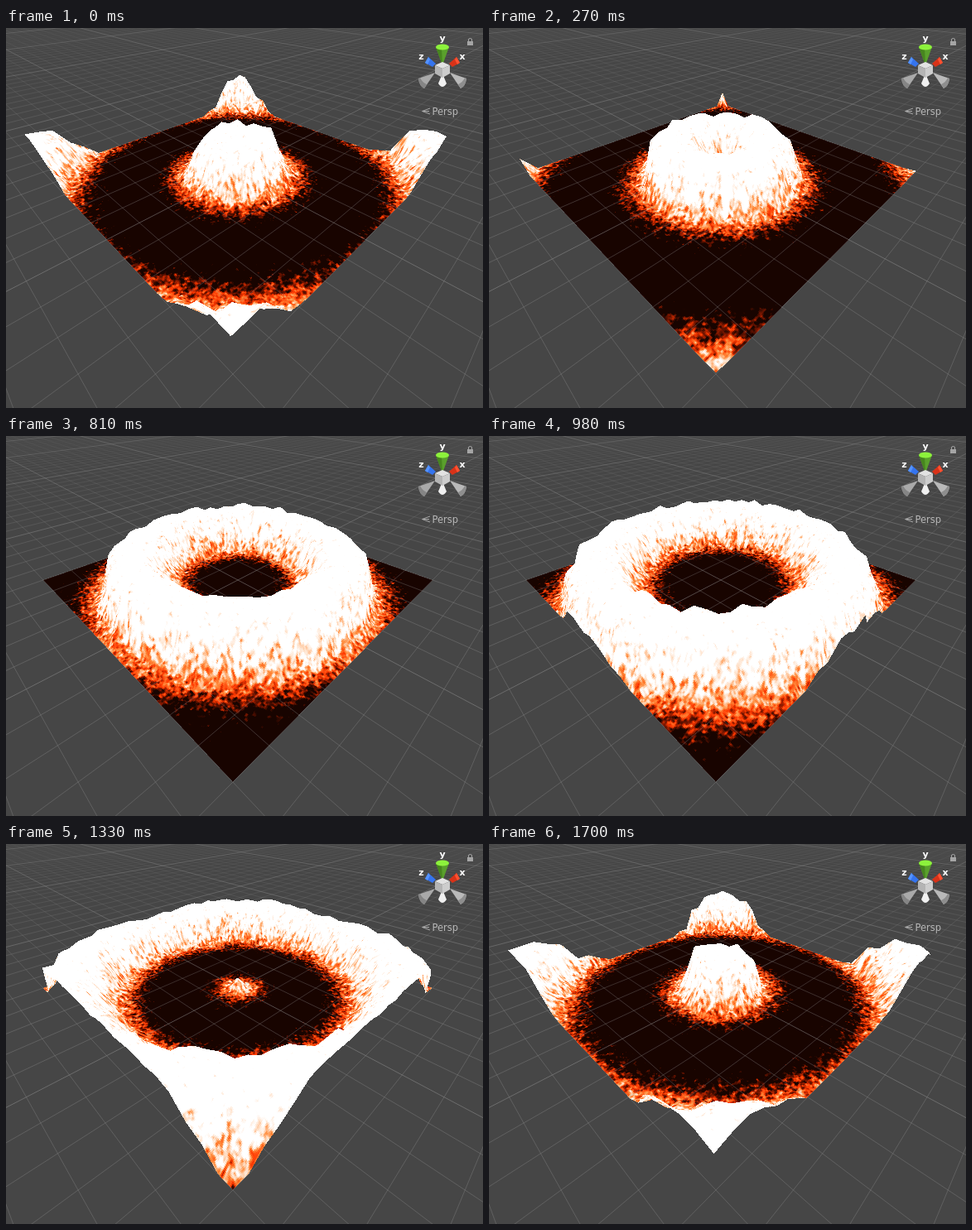
Write an HTML page with a canvas that moves like this. It is 576 px wide and 459 px high and loops after 1800 ms.

```html
<!DOCTYPE html>
<html lang="en">
<head>
<meta charset="utf-8">
<title>Radial wave</title>
<style>
  html, body { margin: 0; width: 576px; height: 459px; overflow: hidden; background: #464646; }
  canvas, svg { position: absolute; left: 0; top: 0; display: block; }
  text { font-family: "DejaVu Sans", sans-serif; }
</style>
</head>
<body>
<canvas id="view" width="576" height="459"></canvas>
<svg width="576" height="459" viewBox="0 0 576 459">
  <g id="gizmo">
    <path d="M498 61L518 54L505 73Q499 70 498 61Z" fill="#a9a9a9"/>
    <path d="M498 61Q499 70 505 73L508 68Q502 65 500 60Z" fill="#858585"/>
    <path d="M556 61L536 54L549 73Q555 70 556 61Z" fill="#b9b9b9"/>
    <path d="M556 61Q555 70 549 73L546 68Q552 65 554 60Z" fill="#8e8e8e"/>
    <path d="M527 55L522 67Q527 75 532 67Z" fill="#f0f0f0"/>
    <path d="M519 23L527 45L535 23Z" fill="#5aa02c"/>
    <path d="M519 23L527 45L526 23Z" fill="#47851f"/>
    <ellipse cx="527" cy="23" rx="8" ry="3.6" fill="#8df23c"/>
    <path d="M506 42L510 35L519 43L515 47Z" fill="#3574ee"/>
    <path d="M506 42L510 35L512 38L509 44Z" fill="#5593ff"/>
    <path d="M548 42L544 35L535 43L539 47Z" fill="#d83218"/>
    <path d="M548 42L544 35L542 38L545 44Z" fill="#ff5131"/>
    <path d="M518 45L527 41L536 45L527 49Z" fill="#e2e2e2"/>
    <path d="M518 45L527 49V60L518 55Z" fill="#b4b4b4"/>
    <path d="M536 45L527 49V60L536 55Z" fill="#cdcdcd"/>
    <g fill="#fff" font-size="11" font-weight="bold" text-anchor="middle">
      <text x="527" y="16">y</text><text x="501.5" y="38">z</text><text x="551" y="38">x</text>
    </g>
  </g>
  <g fill="none" stroke="#a5a5a5">
    <path d="M558.5 16V14Q558.5 12.5 560.5 12.5Q562.5 12.5 562.5 14V16"/>
    <rect x="557" y="16" width="7" height="5" fill="#a5a5a5" stroke="none"/>
    <path d="M512 97L502.5 100.5L512 104M503 100.5H511" stroke="#a8a8a8"/>
  </g>
  <text x="514.5" y="105" font-size="11.5" fill="#b8b8b8">Persp</text>
</svg>
<script>
const W = 576, H = 459, LOOP = 1800, LAST = 1700;
const WAVELENGTH = 0.865, SPEED = WAVELENGTH / LOOP, LEAD = 210;
const CELLS = 24, TEX = 512, BINS = 512, AMPLITUDE = 0.207;
const ctx = document.getElementById('view').getContext('2d');

const clamp = (x, lo = 0, hi = 1) => Math.min(hi, Math.max(lo, x));
const smooth = (lo, hi, x) => { const k = clamp((x - lo) / (hi - lo)); return k * k * (3 - 2 * k); };

function hash(x, y) {
  let n = Math.imul(x, 374761393) + Math.imul(y, 668265263) | 0;
  n = Math.imul(n ^ n >>> 13, 1274126177);
  return ((n ^ n >>> 16) >>> 0) / 4294967296;
}

function valueNoise(x, y) {
  const i = Math.floor(x), j = Math.floor(y);
  const fx = smooth(0, 1, x - i), fy = smooth(0, 1, y - j);
  const top = hash(i, j) * (1 - fx) + hash(i + 1, j) * fx;
  const low = hash(i, j + 1) * (1 - fx) + hash(i + 1, j + 1) * fx;
  return top * (1 - fy) + low * fy - 0.5;
}

// a runs left to right, b far to near, h up; one unit is half the plane's diagonal.
function project(a, b, h) {
  const w = 1 - 0.497 * b - 0.4135 * h;
  return {
    x: (280 + 235 * a - 142.2 * b - 119.1 * h) / w,
    y: (174 + 36.26 * b - 275.6 * h) / w,
    q: 1 / w
  };
}

// Ground grid, kept as an opacity per pixel.
function makeGrid() {
  const canvas = document.createElement('canvas');
  canvas.width = W;
  canvas.height = H;
  const g = canvas.getContext('2d');
  const fade = (far, near) => {
    const gradient = g.createLinearGradient(0, 0, 0, 200);
    gradient.addColorStop(0, `rgba(255,255,255,${far})`);
    gradient.addColorStop(1, `rgba(255,255,255,${near})`);
    return gradient;
  };
  const minor = fade(0.09, 0.37), major = fade(0.38, 0.55);
  for (let k = -60; k <= 30; k++) {
    const c = k * 0.2, end = 3.5 - c;
    g.strokeStyle = k % 10 ? minor : major;
    for (const side of [-1, 1]) {
      const from = project(side * (c + 14) / 2, (c - 14) / 2, 0);
      const to = project(side * (c - end) / 2, (c + end) / 2, 0);
      g.beginPath();
      g.moveTo(from.x, from.y);
      g.lineTo(to.x, to.y);
      g.stroke();
    }
  }
  const data = g.getImageData(0, 0, W, H).data;
  return Float32Array.from({ length: W * H }, (_, i) => data[i * 4 + 3] / 255);
}

const STOPS = [
  [0, 24, 4, 0], [0.1, 24, 4, 0], [0.28, 120, 22, 0], [0.44, 255, 56, 0],
  [0.62, 255, 140, 60], [0.78, 255, 224, 200], [0.92, 255, 255, 255], [1, 255, 255, 255]
];
const ramp = Array.from({ length: 256 }, (_, i) => {
  const x = i / 255;
  const n = Math.max(1, STOPS.findIndex(s => s[0] >= x));
  const lo = STOPS[n - 1], hi = STOPS[n], k = (x - lo[0]) / (hi[0] - lo[0]);
  return [1, 2, 3].map(c => lo[c] + (hi[c] - lo[c]) * k);
});

const grain = new Float32Array(TEX * TEX);
const radiusBin = new Uint16Array(TEX * TEX);
for (let j = 0, p = 0; j < TEX; j++) {
  for (let i = 0; i < TEX; i++, p++) {
    grain[p] = 0.5 * valueNoise(i / 5, j / 5) + 0.35 * valueNoise(i / 2.5 + 50, j / 2.5)
      + 0.12 * valueNoise(i / 14, j / 14 + 90);
    const u = 2 * i / TEX - 1, v = 2 * j / TEX - 1;
    radiusBin[p] = Math.min(BINS - 1, Math.hypot(u, v) * Math.SQRT1_2 * BINS);
  }
}

// The far and left corners rise early, the right and near ones late.
const offsets = { '-1,-1': 0.1, '-1,1': 0.08, '1,-1': -0.15, '1,1': -0.15 };
const vertices = [];
for (let j = 0; j <= CELLS; j++) {
  for (let i = 0; i <= CELLS; i++) {
    const u = 2 * i / CELLS - 1, v = 2 * j / CELLS - 1;
    vertices.push({
      u, v, a: (u - v) / 2, b: (u + v) / 2, r: Math.hypot(u, v) * Math.SQRT1_2,
      shift: offsets[`${u},${v}`] ?? (hash(i + 7, j + 3) - 0.5) * 0.2,
      tall: 0.98 + 0.05 * hash(i + 40, j + 11)
    });
  }
}

const grid = makeGrid();
const image = ctx.createImageData(W, H);
const nearness = new Float32Array(W * H);
const heat = new Float32Array(BINS);

function put(p, r, g, b, line) {
  const k = line * 0.85, o = p * 4, d = image.data;
  d[o] = r + (150 - r) * k;
  d[o + 1] = g + (150 - g) * k;
  d[o + 2] = b + (150 - b) * k;
  d[o + 3] = 255;
}

function triangle(A, B, C) {
  const area = (B.x - A.x) * (C.y - A.y) - (C.x - A.x) * (B.y - A.y);
  if (!area) return;
  const x0 = Math.max(0, Math.ceil(Math.min(A.x, B.x, C.x) - 0.5));
  const x1 = Math.min(W - 1, Math.floor(Math.max(A.x, B.x, C.x) - 0.5));
  const y0 = Math.max(0, Math.ceil(Math.min(A.y, B.y, C.y) - 0.5));
  const y1 = Math.min(H - 1, Math.floor(Math.max(A.y, B.y, C.y) - 0.5));
  for (let y = y0; y <= y1; y++) {
    for (let x = x0; x <= x1; x++) {
      const px = x + 0.5, py = y + 0.5;
      const ka = ((B.x - px) * (C.y - py) - (C.x - px) * (B.y - py)) / area;
      const kb = ((C.x - px) * (A.y - py) - (A.x - px) * (C.y - py)) / area;
      const kc = 1 - ka - kb;
      if (ka < 0 || kb < 0 || kc < 0) continue;
      const qa = ka * A.q, qb = kb * B.q, qc = kc * C.q, q = qa + qb + qc;
      const p = y * W + x;
      if (q <= nearness[p]) continue;
      nearness[p] = q;
      const u = (qa * A.u + qb * B.u + qc * C.u) / q;
      const v = (qa * A.v + qb * B.v + qc * C.v) / q;
      const h = (qa * A.h + qb * B.h + qc * C.h) / q;
      const i = clamp((u + 1) / 2 * TEX | 0, 0, TEX - 1);
      const j = clamp((v + 1) / 2 * TEX | 0, 0, TEX - 1);
      const texel = j * TEX + i;
      const color = ramp[clamp(heat[radiusBin[texel]] + grain[texel]) * 255 | 0];
      put(p, color[0], color[1], color[2], h < 0.004 ? grid[p] : 0);
    }
  }
}

function render(time) {
  const crest = SPEED * (time + LEAD);
  // Crests run slightly ahead towards the corners.
  const wave = r => Math.cos(2 * Math.PI * (r - 0.05 * r ** 4 - crest) / WAVELENGTH);
  for (let i = 0; i < BINS; i++) heat[i] = 0.8 * wave((i + 0.5) / BINS) + 0.42;

  nearness.fill(0);
  for (let p = 0; p < W * H; p++) put(p, 70, 70, 70, grid[p]);

  const points = vertices.map(n => {
    const h = AMPLITUDE * n.tall * smooth(0.26, 1, wave(n.r) + n.shift);
    return { ...project(n.a, n.b, h), u: n.u, v: n.v, h };
  });
  for (let j = 0; j < CELLS; j++) {
    for (let i = 0; i < CELLS; i++) {
      const n = j * (CELLS + 1) + i, m = n + CELLS + 1;
      triangle(points[n], points[n + 1], points[m + 1]);
      triangle(points[n], points[m + 1], points[m]);
    }
  }
  ctx.putImageData(image, 0, 0);
}

const start = performance.now();
function tick() {
  const t = (performance.now() - start) % LOOP;
  render(t < 20 ? 0 : Math.min(LAST, t));
  requestAnimationFrame(tick);
}
tick();
</script>
</body>
</html>
```
